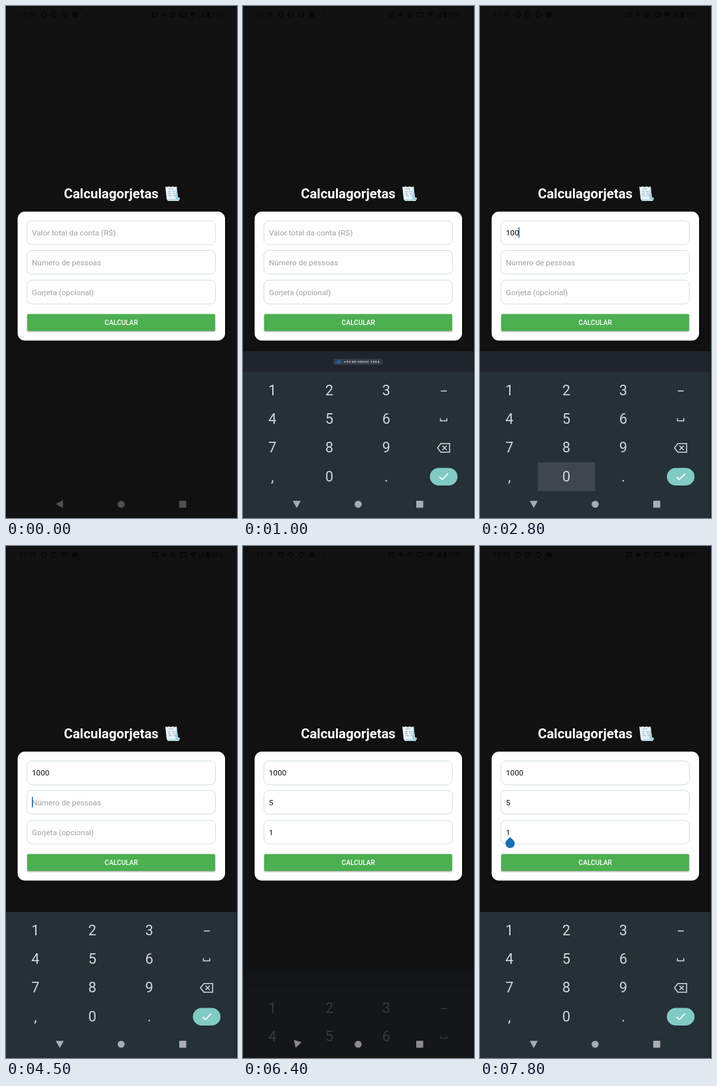
An HTML page that plays this animation: 348 by 772 pixels, repeating every 8 s.

```html
<!DOCTYPE html>
<html lang="pt-BR">
<head>
<meta charset="utf-8">
<title>Calculagorjetas</title>
<style>
  html, body { margin: 0; height: 100%; overflow: hidden; background: #111; }
  svg { display: block; width: 100vw; height: 100vh; font-family: Roboto, sans-serif; }
  .title { font-size: 20.3px; font-weight: 700; fill: #fff; }
  .status { fill: #050505; opacity: .8; font-size: 10px; }
  .status .ring { fill: none; stroke: #050505; stroke-width: 1.6; }
  .card { fill: #fff; filter: drop-shadow(0 1px 2px #0008); }
  .field { fill: #fefefe; stroke: #d5e0e4; }
  .input { font-size: 11.7px; fill: #111; }
  .hint { fill: #a0a0a0; }
  .cursor { fill: #1f6fae; }
  .button { fill: #4caf50; filter: drop-shadow(0 1.5px 1.2px #0006); }
  .label { font-size: 10.1px; font-weight: 500; fill: #fff; text-anchor: middle; }
  .keys { font-size: 21.5px; fill: #d3d8da; text-anchor: middle; }
  .line { fill: none; stroke: #d3d8da; stroke-width: 1.5; }
  .pressed { fill: #3f474d; }
  .phone { font-size: 9.7px; fill: #f1f3f4; }

  #keyboard, #back, #nav, #chip { animation: 8s linear infinite; }
  #keyboard { animation-name: keyboard; }
  #nav { animation-name: nav; }
  #back { animation-name: back; transform-origin: 81px 751px; }
  #chip { animation-name: chip; transform-origin: 173.5px 536.5px; }

  @keyframes keyboard {
    0%, 1.25% { transform: translateY(252px); opacity: 0; animation-timing-function: cubic-bezier(.2, .6, .2, 1); }
    6.25%, 78.125% { transform: none; opacity: 1; }
    80% { transform: translateY(116px); opacity: .2; }
    81.25% { transform: translateY(200px); opacity: 0; }
    92.5% { transform: translateY(252px); opacity: 0; animation-timing-function: cubic-bezier(.2, .6, .2, 1); }
    96.25%, 100% { transform: none; opacity: 1; }
  }
  @keyframes nav {
    0%, 1.25% { fill: #505050; }
    6.25%, 78.75% { fill: #a8adb1; }
    80% { fill: #8b8b8b; }
    82.5%, 92.5% { fill: #505050; }
    97%, 100% { fill: #a8adb1; }
  }
  @keyframes back {
    0%, 1.25% { transform: rotate(0); }
    5%, 78.75% { transform: rotate(-90deg); }
    80% { transform: rotate(-74deg); }
    82.5%, 92.5% { transform: rotate(0); }
    96.25%, 100% { transform: rotate(-90deg); }
  }
  @keyframes chip {
    0%, 12.5% { transform: scale(.64, .36); }
    13.75%, 65% { transform: none; }
    65.1%, 70% { transform: scale(.64, .36); }
    71.25%, 100% { transform: none; }
  }
</style>
</head>
<body>
<svg viewBox="0 0 348 772" preserveAspectRatio="none">
  <rect width="348" height="772" fill="#111"/>

  <g class="status">
    <text x="20" y="17">17:19</text>
    <circle class="ring" cx="57" cy="13" r="3.6"/>
    <circle class="ring" cx="72" cy="13" r="3.6"/>
    <circle class="ring" cx="88" cy="13" r="3.6"/>
    <circle cx="104" cy="13" r="4.2"/>
    <circle cx="121" cy="13" r="1.2"/>
    <rect class="ring" x="221" y="10" width="6" height="6"/>
    <path d="M238 9l4 4-4 4-4-4z"/>
    <circle class="ring" cx="251" cy="13" r="3"/>
    <rect class="ring" x="263" y="10" width="8" height="6"/>
    <path d="M277 11q5-4 10 0l-5 6zM291 17v-3h1.5v3zM294 17v-6h1.5v6zM297 17V9h1.5v8z"/>
    <rect x="302" y="9" width="5" height="9" rx="1"/>
    <text x="309" y="17">99%</text>
  </g>

  <text class="title" x="158.5" y="290" text-anchor="middle">Calculagorjetas</text>
  <g>
    <path d="M240 272l2 1 3-1 3 1 3-1 3 1 3-1 2 16 3 2-2 4h-16l-2-3z" fill="#e8f3f9"/>
    <path d="M257 272l2 17h3l-1 4h-5l-1-4z" fill="#a5cfe2"/>
    <path d="M244 291h11l2 3h-13z" fill="#bddce9"/>
    <path d="M245 276h7M244 280h4M250 280h5M244 283h4M251 283h4M245 286h5M252 286h4" stroke="#8aa3b0" stroke-width=".9"/>
  </g>

  <rect class="card" x="17.5" y="310" width="312.5" height="194.5" rx="11"/>
  <rect class="field" x="31.5" y="324" width="284" height="35.8" rx="7.5"/>
  <rect class="field" x="31.5" y="368.5" width="284" height="35.8" rx="7.5"/>
  <rect class="field" x="31.5" y="413.4" width="284" height="35.8" rx="7.5"/>
  <g class="input">
    <text class="hint" x="39" y="346" data-on="0-1300">Valor total da conta (R$)</text>
    <text x="39" y="346"><tspan></tspan></text>
    <text x="39" y="346" data-on="1300-1900">1</text>
    <text x="39" y="346" data-on="1900-2400">10</text>
    <text x="39" y="346" data-on="2400-2900">100</text>
    <text x="39" y="346" data-on="2900-8000">1000</text>
    <text class="hint" x="39" y="390.5" data-on="0-4800">Número de pessoas</text>
    <text x="39" y="390.5" data-on="4800-8000">5</text>
    <text class="hint" x="39" y="435.5" data-on="0-6200">Gorjeta (opcional)</text>
    <text x="39" y="435.5" data-on="6200-8000">1</text>
  </g>
  <g class="cursor" id="cursors"></g>

  <rect class="button" x="32" y="464.5" width="283" height="25.5" rx="1.5"/>
  <text class="label" x="173.7" y="481">CALCULAR</text>

  <path data-on="7500-8000" fill="#1a6fb3" d="M45.3 439l5 4.7a7 7 0 1 1-10 0z"/>

  <g id="keyboard">
    <g data-on="1000-3500 5500-6500">
      <rect y="520.5" width="347" height="32" fill="#20252b"/>
      <g data-on="1000-1400 5600-6200">
        <g id="chip">
          <rect x="116" y="524" width="114.5" height="25" rx="5" fill="#373c44"/>
          <g fill="none" stroke="#1a73d8" stroke-width="1.4">
            <circle cx="128.3" cy="536.7" r="5.7"/>
            <circle cx="128.3" cy="534.9" r="1.7"/>
            <path d="M124.6 540.8q3.7-3.4 7.4 0"/>
          </g>
          <text class="phone" x="139.5" y="540.2">+55 00 90000-1234</text>
        </g>
      </g>
    </g>
    <rect y="552" width="347" height="220" fill="#253037"/>
    <rect class="pressed" x="1" y="558" width="86" height="43" data-on="1200-1400"/>
    <rect class="pressed" x="87" y="688" width="86.5" height="43.5" data-on="1800-1900 2300-2400 2800-3000"/>
    <g class="keys" id="digits"></g>
    <path class="line" d="M298 580.5h9M297.5 621.5v4h9.500v-4"/>
    <path class="line" d="M298 659.700h13.300v13H298l-5-6.500zM300.500 663l6.500 6.500m0-6.500l-6.500 6.500"/>
    <rect x="281.500" y="696.500" width="41.700" height="26.500" rx="13.250" fill="#80cbc4"/>
    <path d="M296 709.800l4.200 4.200 8.800-8.800" fill="none" stroke="#fff" stroke-width="1.700"/>
  </g>

  <g id="nav">
    <path id="back" d="M75 751l10.800-6v12z"/>
    <circle cx="173.500" cy="751.300" r="5.300"/>
    <rect x="261" y="746" width="10.500" height="10.500" rx=".5"/>
  </g>
</svg>
<script>
  const LOOP = 8000;
  const SVG = 'http://www.w3.org/2000/svg';

  function add(parentId, tag, attrs, text = '') {
    const el = document.createElementNS(SVG, tag);
    for (const key in attrs) el.setAttribute(key, attrs[key]);
    el.textContent = text;
    document.getElementById(parentId).append(el);
  }

  ['123', '456', '789', ',0.'].forEach((row, r) =>
    [...row].forEach((key, c) =>
      add('digits', 'text', { x: 44.3 + c * 85.8, y: 586.6 + r * 43.4 }, key)));

  // Field row, number of characters before the cursor, visible spans
  [
    [0, 0, '200-700 1200-1300'],
    [0, 1, '1300-1800'],
    [0, 2, '1900-2400'],
    [0, 3, '2400-2900'],
    [0, 4, '2900-3400'],
    [1, 0, '3500-4000 4500-4800'],
    [1, 1, '4800-5300'],
    [2, 0, '5400-5900'],
    [2, 1, '6200-6300']
  ].forEach(([row, chars, spans]) => add('cursors', 'rect', {
    x: 39 + chars * 6.3, y: 333.5 + row * 44.6, width: 1.5, height: 16, 'data-on': spans
  }));

  // Shows an element only during its listed spans of the loop
  for (const el of document.querySelectorAll('[data-on]')) {
    const spans = el.dataset.on.split(' ').map(span => span.split('-').map(Number));
    const frames = [];
    const key = (ms, opacity) => frames.push({ offset: ms / LOOP, opacity, easing: 'steps(1, end)' });
    if (spans[0][0] > 0) key(0, 0);
    for (const [from, to] of spans) {
      key(from, 1);
      key(to, to === LOOP ? 1 : 0);
    }
    if (frames[frames.length - 1].offset < 1) key(LOOP, 0);
    el.animate(frames, { duration: LOOP, iterations: Infinity });
  }
</script>
</body>
</html>
```
